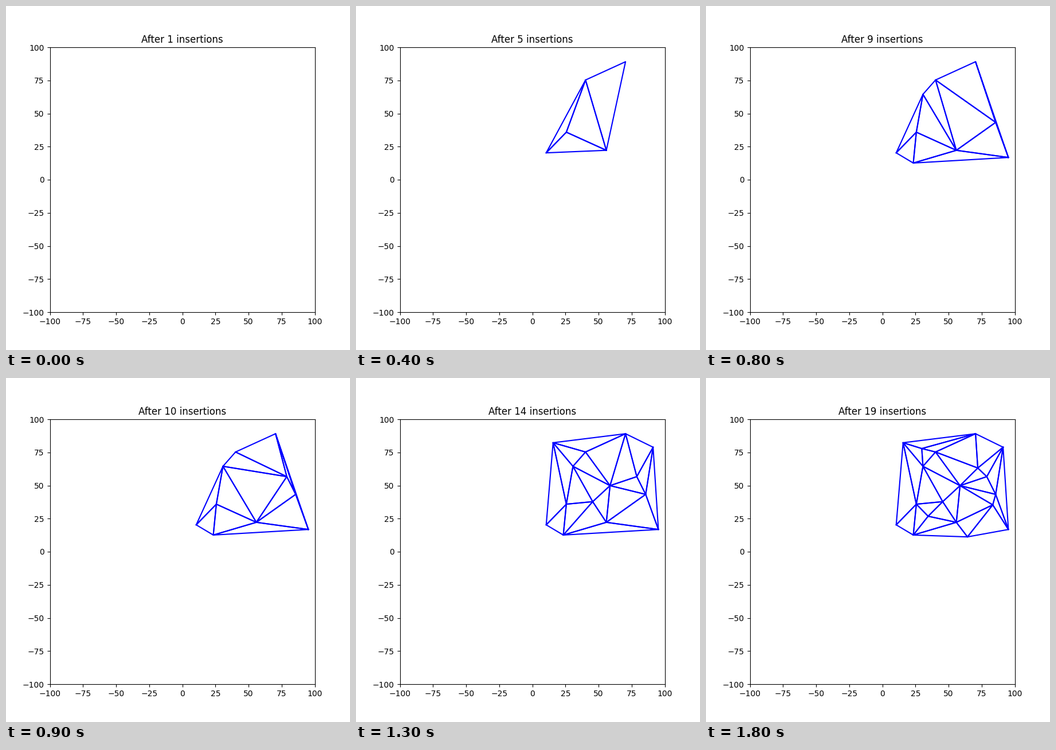
A matplotlib script that plays this animation: 600x600 px, repeating every 1900 ms.

```python
import matplotlib.pyplot as plt
from matplotlib.animation import FuncAnimation
from matplotlib.tri import Triangulation

# Points in order of insertion
POINTS = [
    (10.5, 20.3), (25.7, 35.9), (40.2, 75.3), (55.9, 22.2), (70.4, 89.1),
    (95.2, 16.8), (30.7, 64.5), (85.6, 43.3), (23.4, 12.6), (78.9, 56.7),
    (45.6, 37.8), (91.2, 78.9), (15.7, 82.3), (58.7, 49.9), (34.6, 26.8),
    (72.1, 63.2), (83.4, 35.4), (29.8, 77.9), (64.3, 11.2),
]
LIMIT = 100

fig, ax = plt.subplots(figsize=(6, 6), dpi=100)


def draw_mesh(points):
    """Outline every Delaunay triangle of the given points."""
    x, y = zip(*points)
    for a, b, c in Triangulation(x, y).triangles:
        loop = [a, b, c, a]
        ax.plot([x[i] for i in loop], [y[i] for i in loop], "b-")


def update(frame):
    count = frame + 1
    ax.clear()
    if count >= 3:
        draw_mesh(POINTS[:count])
    ax.set_xlim(-LIMIT, LIMIT)
    ax.set_ylim(-LIMIT, LIMIT)
    ax.set_aspect("equal")
    ax.set_title(f"After {count} insertions")


anim = FuncAnimation(fig, update, frames=len(POINTS), interval=100,
                     init_func=lambda: None, repeat=True, repeat_delay=0)
plt.show()
```
